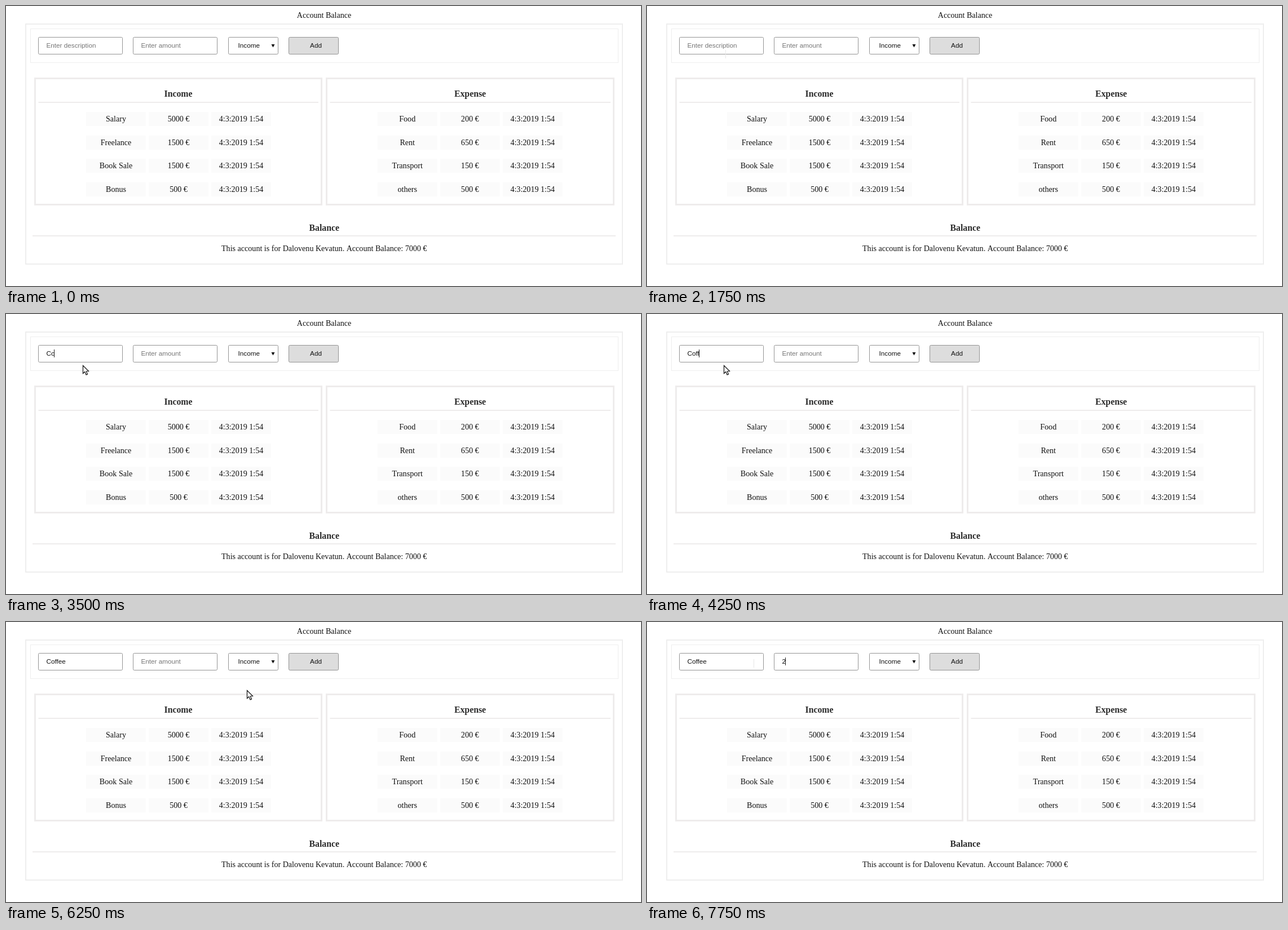
Write an HTML page with a canvas that moves like this. It is 1126 by 497 pixels and loops after 8000 ms.

```html
<!DOCTYPE html>
<html lang="en">
<head>
<meta charset="utf-8">
<title>Account Balance</title>
<style>
  html, body { margin: 0; width: 100%; height: 100%; overflow: hidden; background: #fff; }
  canvas { display: block; }
</style>
</head>
<body>
<canvas id="stage" width="1126" height="497"></canvas>
<script>
const ctx = document.getElementById('stage').getContext('2d');
const LOOP = 8000;
const SERIF = '14.08px "Liberation Serif", serif';
const HEADING = 'bold 15.8px "Liberation Serif", serif';
const SANS = '11.73px "Liberation Sans", sans-serif';
const RULE = '#eeecec';
const INK = '#111';

const income = [['Salary', 5000], ['Freelance', 1500], ['Book Sale', 1500], ['Bonus', 500]];
const expense = [['Food', 200], ['Rent', 650], ['Transport', 150], ['others', 500]];

// Each step holds from its time until the next one.
const pointerSteps = [
  [0],
  [1250, 'arrow', 214, 181],
  [1500, 'arrow', 196, 158],
  [1750, 'beam', 139, 78],
  [2000, 'beam', 142, 69],
  [2500, 'arrow', 136, 91],
  [6250, 'arrow', 427, 121],
  [6500, 'beam', 267, 63],
  [7000, 'beam', 189, 66]
];
const descriptionSteps = [
  [0, ''], [3000, 'C'], [3500, 'Co'], [3750, 'Cof'],
  [4250, 'Coff'], [5000, 'Coffe'], [5500, 'Coffee']
];
const amountSteps = [[0, ''], [7750, '2']];
const caretSteps = [
  [0], [2250, 'description'], [2750], [3000, 'description'],
  [6000], [6750, 'amount'], [7250], [7750, 'amount']
];

function at(steps, time) {
  return steps.filter(step => step[0] <= time).pop().slice(1);
}

function text(value, x, y, font = SERIF, color = INK, align = 'center') {
  ctx.font = font;
  ctx.fillStyle = color;
  ctx.textAlign = align;
  ctx.fillText(value, x, y);
}

function rect(x, y, w, h, color) {
  ctx.fillStyle = color;
  ctx.fillRect(x, y, w, h);
}

function frame(x, y, w, h, line, color) {
  ctx.lineWidth = line;
  ctx.strokeStyle = color;
  ctx.strokeRect(x + line / 2, y + line / 2, w - line, h - line);
}

function control(x, width, fill = '#fff') {
  ctx.beginPath();
  ctx.roundRect(x + 0.5, 55.5, width - 1, 30, 2);
  ctx.fillStyle = fill;
  ctx.fill();
  ctx.lineWidth = 1;
  ctx.strokeStyle = '#949494';
  ctx.stroke();
}

function input(x, value, placeholder, focused) {
  control(x, 150);
  const left = x + 14.5;
  text(value || placeholder, left, 74, SANS, value ? INK : '#757575', 'left');
  if (focused) {
    const end = left + (value ? ctx.measureText(value).width : 0);
    rect(Math.floor(end - 0.5), 63, 1, 14, '#222');
  }
}

function panel(x, width, title, rows, firstCell) {
  frame(x, 127, width, 227, 3, RULE);
  text(title, x + width / 2, 161, HEADING, '#2b2b2b');
  rect(x + 7.5, 170, width - 14.5, 2, RULE);
  rows.forEach(([name, sum], row) => {
    const dy = row * 41.6;
    [name, sum + ' €', '4:3:2019 1:54'].forEach((value, column) => {
      const cellX = firstCell + column * 111;
      rect(cellX, Math.round(188 + dy), 106, 25, '#fbfbfb');
      text(value, cellX + 53, Math.round(205 + dy));
    });
  });
}

function arrow(x, y) {
  ctx.save();
  ctx.translate(x + 0.5, y + 0.5);
  ctx.beginPath();
  [[0, 0], [0, 14], [3.2, 11], [5.6, 16.4], [8, 15.4], [5.8, 10.2], [10, 10]]
    .forEach(([px, py]) => ctx.lineTo(px, py));
  ctx.closePath();
  ctx.fillStyle = '#fff';
  ctx.fill();
  ctx.lineWidth = 1.2;
  ctx.strokeStyle = '#111';
  ctx.stroke();
  ctx.restore();
}

function beam(x, y) {
  rect(x, y, 1, 15, '#e6e6e6');
}

function draw(time) {
  const [description] = at(descriptionSteps, time);
  const [amount] = at(amountSteps, time);
  const [focus] = at(caretSteps, time);
  const [pointer, px, py] = at(pointerSteps, time);

  rect(0, 0, 1126, 497, '#fff');
  text('Account Balance', 564, 21);
  frame(34, 31, 1060, 428, 2, '#eee');
  frame(43, 40, 1043, 61, 1, '#eee');

  input(57, description, 'Enter description', focus === 'description');
  input(225, amount, 'Enter amount', focus === 'amount');
  control(394, 89);
  text('Income', 411.5, 74, SANS, INK, 'left');
  ctx.beginPath();
  ctx.moveTo(470.5, 68);
  ctx.lineTo(476.5, 68);
  ctx.lineTo(473.5, 73.5);
  ctx.fill();
  control(501, 89, '#ddd');
  text('Add', 549.5, 74, SANS);

  panel(50, 511, 'Income', income, 142);
  panel(567, 512, 'Expense', expense, 658.7);

  text('Balance', 564.3, 399, HEADING, '#2b2b2b');
  rect(47, 407, 1034, 2, RULE);
  text('This account is for Dalovenu Kevatun. Account Balance: 7000 €', 564.2, 435);

  if (pointer === 'arrow') arrow(px, py);
  if (pointer === 'beam') beam(px, py);
}

const start = performance.now();
function tick() {
  draw((performance.now() - start) % LOOP);
  requestAnimationFrame(tick);
}
tick();
</script>
</body>
</html>
```
